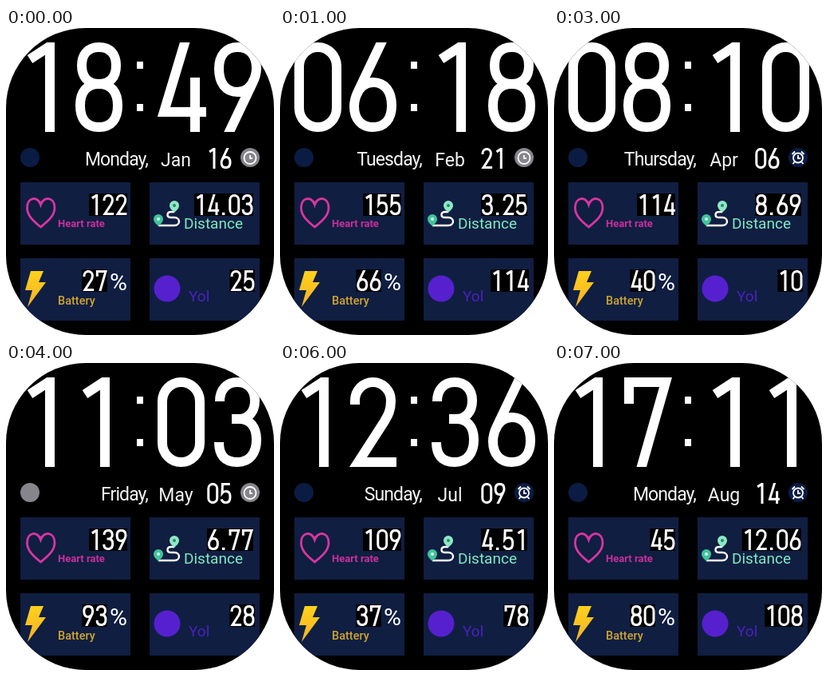
Write an HTML page that moves like this. It is 336 px wide and 384 px high and loops after 8000 ms.

```html
<!DOCTYPE html>
<html lang="en">
<meta charset="utf-8">
<title>Watch face</title>
<style>
  html, body { margin: 0; width: 100%; height: 100%; overflow: hidden; background: #fff; }
  svg { display: block; }
  text { font-family: Roboto, sans-serif; }
  .date { font-size: 23px; fill: #f4f4f4; }
  .line { fill: none; stroke: #fff; }
</style>
<svg width="336" height="384" viewBox="0 0 336 384">
  <defs>
    <clipPath id="screen"><rect width="336" height="384" rx="100"/></clipPath>
    <clipPath id="cell"><rect x="-2" width="65" height="112"/></clipPath>
    <linearGradient id="gold" x2="0" y2="1">
      <stop stop-color="#ffd21c"/><stop offset="1" stop-color="#f6b027"/>
    </linearGradient>
  </defs>
  <g clip-path="url(#screen)">
    <rect width="336" height="384"/>
    <path fill="#101e42" d="M18 193h138v78H18zM180 193h138v78H180zM18 288h138v78H18zM180 288h138v78H180z"/>
    <path fill="#fff" d="M164 42h8v9h-8zM164 95h8v9h-8z"/>

    <path class="line" style="stroke:#d8359f" stroke-width="2.8" d="M43.5 249C35 242 26.5 235 26.5 225C26.5 211 40 210 43.5 221C47 210 61 211 61 225C61 235 52 242 43.5 249Z"/>
    <text x="65" y="249" font-size="13" font-weight="700" fill="#c9309c">Heart rate</text>

    <path class="line" stroke-width="2.4" d="M191 247H211C219 247 219 237 211 237H207C201 237 201 230 207 230H211"/>
    <path fill="#8ce9c4" d="M211 231C207 227 205 225 205 222a6 6 0 0 1 12 0C217 225 215 227 211 231Z"/>
    <path fill="#41c49a" d="M191 248C187 244 185 242 185 239a6 6 0 0 1 12 0C197 242 195 244 191 248Z"/>
    <circle cx="211" cy="222" r="2" fill="#30866e"/>
    <circle cx="191" cy="239" r="2" fill="#d8fff0"/>
    <text x="223" y="251" font-size="19" fill="#7feac2">Distance</text>

    <path fill="url(#gold)" d="M31 304H47L41 318H50L27 349L33 328H24Z"/>
    <text x="65" y="346" font-size="14.5" font-weight="500" fill="#d0a62f">Battery</text>
    <text x="130" y="328" font-size="30" fill="#fff">%</text>

    <circle cx="202" cy="326" r="16.5" fill="#5620cf"/>
    <text x="229" y="342" font-size="19" fill="#4b22bd">Yol</text>

    <g id="live"></g>
  </g>
</svg>
<script>
// Numeral strokes, clipped to a cell 112 high
const GLYPHS = {
  0: 'M6 30A23.5 24 0 0 1 53 30V82A23.5 24 0 0 1 6 82Z',
  1: 'M12 21L35 6H37V112',
  2: 'M7 34V29A22.5 23 0 0 1 52 29C52 42 48 48 44 55L11 106H59',
  3: 'M7 30C7 15 16 6 29 6S51 15 51 29 43 52 31 52H22M31 52C45 52 53 62 53 78S45 106 29 106 6 97 6 81',
  4: 'M36 -6L8 87H61M47 44V112',
  5: 'M52 6H12L10 54C15 47 22 45 30 45C46 45 53 57 53 75S45 106 29 106C16 106 9 99 6 88',
  6: 'M43 -6L11 61C7 69 6 74 6 80C6 96 15 106 29.5 106S53 96 53 79 45 50 30 50C20 50 13 55 9 66',
  7: 'M7 33V6H53L21 118',
  8: 'M29.5 6C15 6 8 16 8 29S15 52 29.5 52 51 43 51 29 44 6 29.5 6ZM29.5 52C14 52 6 62 6 79S14 106 29.5 106 53 96 53 79 45 52 29.5 52Z',
  9: 'M16 118L48 51C52 43 53 38 53 32C53 16 44 6 29.5 6S6 16 6 33 14 62 29 62C39 62 46 57 50 46',
  '.': 'M14 98V112'
};

// time, weekday, month, day, heart rate, distance, battery, points, bluetooth on, alarm on
const STATES = [
  ['1849', 'Monday', 'Jan', '16', '122', '14.03', '27', '25', 1, 0],
  ['0618', 'Tuesday', 'Feb', '21', '155', '3.25', '66', '114', 1, 0],
  ['1527', 'Wednesday', 'Mar', '13', '87', '10.48', '52', '63', 1, 1],
  ['0810', 'Thursday', 'Apr', '06', '114', '8.69', '40', '10', 1, 1],
  ['1103', 'Friday', 'May', '05', '139', '6.77', '93', '28', 0, 0],
  ['1425', 'Saturday', 'Jun', '24', '96', '7.32', '71', '46', 0, 1],
  ['1236', 'Sunday', 'Jul', '09', '109', '4.51', '37', '78', 1, 1],
  ['1711', 'Monday', 'Aug', '14', '45', '12.06', '80', '108', 1, 1]
];
const TIME_X = [18, 87, 190, 261];
const STEP = 1000, SMALL = 0.232;
const live = document.getElementById('live');

const glyph = (char, x, y, scale, weight) =>
  `<path class="line" clip-path="url(#cell)" stroke-width="${char === '.' ? 15 : weight}"
    d="${GLYPHS[char]}" transform="translate(${x} ${y}) scale(${scale})"/>`;

// Right-aligned number on a black backing
function number(value, right, top) {
  let x = right, marks = '';
  for (const char of [...value].reverse()) {
    x -= char === '.' ? 10 : 16.3;
    marks += glyph(char, x + 2, top, SMALL, 13);
  }
  return `<g role="img" aria-label="${value}">
    <rect x="${x + 1}" y="${top - 1}" width="${right - x - 1}" height="28"/>${marks}</g>`;
}

const badge = (x, on) =>
  `<circle cx="${x}" cy="162" r="12" fill="${on ? '#0b1c44' : '#85858b'}"/>`;

function alarm(on) {
  const ears = on ? 'M298.5 158L302 154.5M313.5 158L310 154.5M301.5 167.5L299.5 170M310.5 167.5L312.5 170' : '';
  return badge(306, on) + `<g class="line" stroke-width="1.8">
    <circle cx="306" cy="162.5" r="${on ? 6 : 7.5}"/><path d="M306 159V163H309${ears}"/></g>`;
}

function face([time, weekday, month, day, heart, distance, battery, points, bluetooth, alarmOn]) {
  return `<g role="img" aria-label="${time.slice(0, 2)}:${time.slice(2)}">
      ${TIME_X.map((x, i) => glyph(time[i], x, 18, 1, 12)).join('')}</g>
    <text class="date" x="178" y="172" text-anchor="end" letter-spacing="-0.9">${weekday},</text>
    <text class="date" x="213" y="173" text-anchor="middle">${month}</text>
    ${number(day, 283, 150)}
    ${number(heart, 152, 208)}
    ${number(distance, 310, 208)}
    ${number(battery, 127, 303)}
    ${number(points, 312, 303)}
    ${badge(30, bluetooth)}${alarm(alarmOn)}`;
}

let shown = -1;
function draw() {
  const index = Math.floor(performance.now() / STEP) % STATES.length;
  if (index !== shown) live.innerHTML = face(STATES[shown = index]);
  requestAnimationFrame(draw);
}
draw();
</script>
</html>
```
